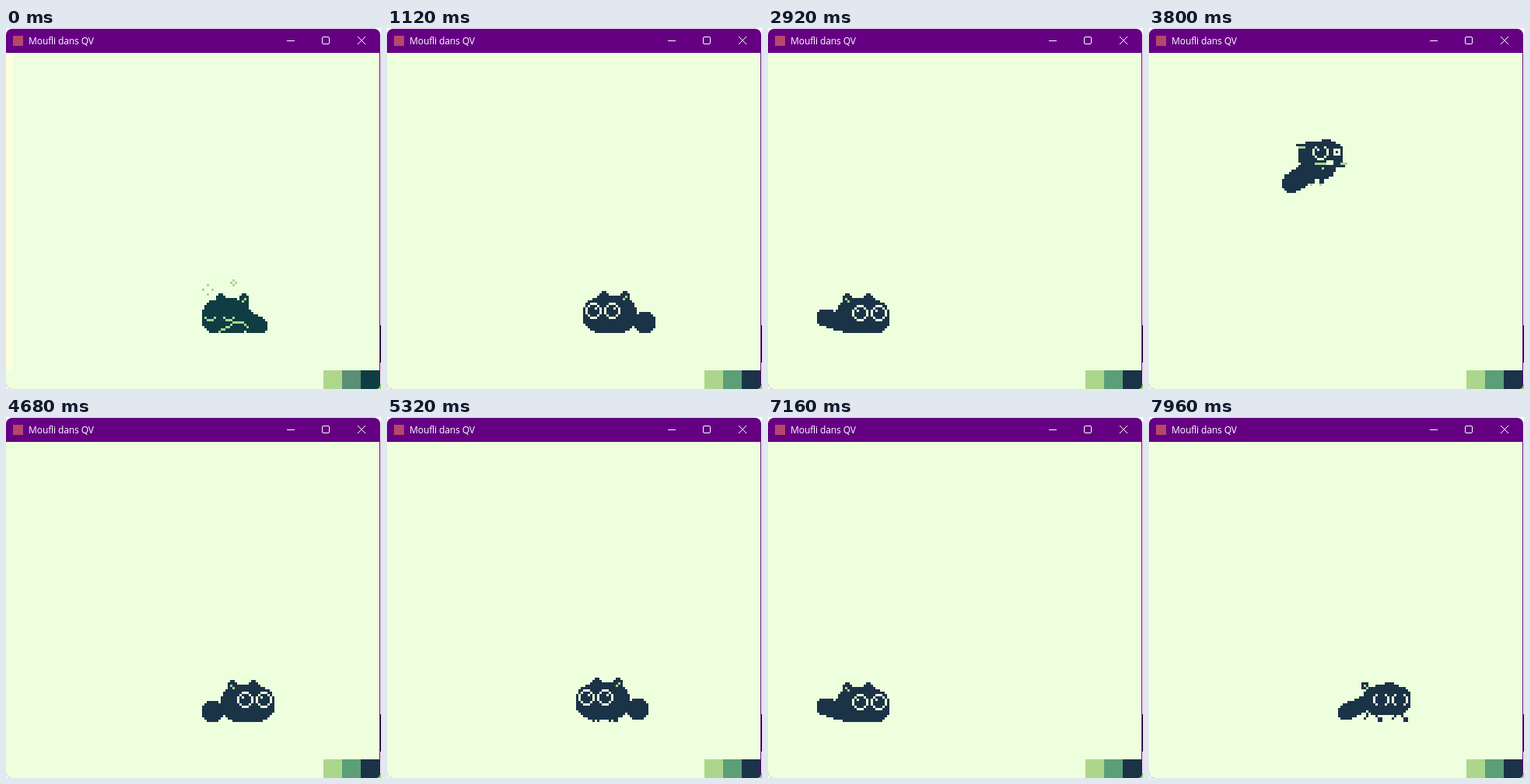
These frames come from a looping animation (482 px wide and 464 px high, 8 s). An HTML page with a canvas:

```html
<!DOCTYPE html>
<html lang="fr">
<head>
<meta charset="utf-8">
<title>Moufli dans QV</title>
<style>
  html, body { margin: 0; width: 100%; height: 100%; overflow: hidden; background: #fff; }
  #stage { position: relative; width: 482px; height: 464px; overflow: hidden; background: #fff; }
  #edge { position: absolute; left: 481px; top: 382px; width: 1px; height: 48px; background: #21082f; }
  #corner { position: absolute; left: 474px; top: 458px; width: 8px; height: 6px; background: #83d957; }
  #window { position: absolute; left: 0; top: 1px; width: 481px; height: 463px; overflow: hidden;
    border-radius: 8px 8px 6px 7px; background: #650083; }
  #icon { position: absolute; left: 9px; top: 9px; width: 13px; height: 13px; background: #b5486a; }
  #title { position: absolute; left: 29px; top: 7px; font: 12px/17px "Open Sans", "Noto Sans", sans-serif;
    letter-spacing: -.1px; color: #fff; white-space: nowrap; }
  svg { position: absolute; left: 0; top: -1px; fill: none; stroke: #fff; }
  canvas { position: absolute; left: 0; top: 31px; width: 480px; height: 432px; image-rendering: pixelated; }
</style>
</head>
<body>
<div id="stage">
  <div id="edge"></div>
  <div id="corner"></div>
  <div id="window">
    <div id="icon"></div>
    <div id="title">Moufli dans QV</div>
    <svg width="481" height="32">
      <path d="M361 16.5h10"/>
      <rect x="406.5" y="11.5" width="9" height="9" rx="1.5"/>
      <path d="M452 11l10 10M462 11l-10 10"/>
    </svg>
    <canvas id="screen" width="160" height="144"></canvas>
  </div>
</div>
<script>
const ctx = document.getElementById('screen').getContext('2d');
const LOOP = 8000, GROUND = 120, STRIDE = 90;
const DAWN = { bg: '#eeffdf', soft: '#aed78c', mid: '#5b8e76', dark: '#103c44' };
const DAY = { bg: '#eeffdd', soft: '#acd68b', mid: '#5b9f78', dark: '#1b3347' };

let pal = DAY;
let originX = 0, originY = 0, span = 31, flip = false;

function plot(x, y, tone) {
  if (originY + y >= GROUND) return;
  ctx.fillStyle = pal[tone];
  ctx.fillRect(originX + (flip ? span - 1 - x : x), originY + y, 1, 1);
}

function box(x, y, w, h, tone = 'dark') {
  for (let j = 0; j < h; j++) for (let i = 0; i < w; i++) plot(x + i, y + j, tone);
}

// Superellipse: a higher power gives squarer shoulders.
function blob(cx, cy, rx, ry, power = 2.5) {
  for (let y = Math.floor(cy - ry); y < cy + ry; y++) {
    for (let x = Math.floor(cx - rx); x < cx + rx; x++) {
      const u = Math.abs(x + .5 - cx) / rx, v = Math.abs(y + .5 - cy) / ry;
      if (u ** power + v ** power <= 1) plot(x, y, 'dark');
    }
  }
}

// Round-ended bar, used for slanted tails and haunches.
function capsule(x1, y1, x2, y2, r) {
  const n = Math.ceil(Math.hypot(x2 - x1, y2 - y1));
  for (let i = 0; i <= n; i++) blob(x1 + (x2 - x1) * i / n, y1 + (y2 - y1) * i / n, r, r);
}

function line(x1, y1, x2, y2, tone = 'dark') {
  const n = Math.max(Math.abs(x2 - x1), Math.abs(y2 - y1));
  for (let i = 0; i <= n; i++) {
    plot(Math.round(x1 + (x2 - x1) * i / n), Math.round(y1 + (y2 - y1) * i / n), tone);
  }
}

function ear(cx, inner) {
  box(cx - 2, 1, 4, 4);
  box(cx - 1, 0, 2, 1);
  if (inner) line(cx, 2, cx - 1, 3, 'soft');
}

// Round spectacle rim; an open rim keeps only its two sides.
function rim(cx, cy, open) {
  for (const s of [-1, 1]) {
    line(cx + s * 3, cy - 1, cx + s * 3, cy + 1, 'bg');
    plot(cx + s * 2, cy - 2, 'bg');
    plot(cx + s * 2, cy + 2, 'bg');
    if (!open) line(cx - 1, cy + s * 3, cx + 1, cy + s * 3, 'bg');
  }
}

function sittingHead() {
  blob(11.5, 10.2, 11.5, 8.2);
  ear(9);
  ear(18, true);
  for (const x of [4, 12]) {
    rim(x, 8);
    plot(x + 1, 7, 'bg');
  }
}

function closedEye(x) {
  plot(x, 10, 'soft');
  line(x + 1, 11, x + 3, 11, 'soft');
  plot(x + 4, 10, 'soft');
}

function spark(x, y, r) {
  if (r > 2) return;
  for (const s of [-r, r]) {
    plot(x + s, y, 'soft');
    plot(x, y + s, 'soft');
  }
}

// Sitting and sleeping poses look left, moving ones look right.
const poses = {
  stand() {
    blob(26.5, 13.5, 4.6, 4.6);
    for (const x of [7, 9, 14, 16]) box(x, 17, x === 16 ? 2 : 1, 2);
    sittingHead();
  },
  crouch() {
    blob(27, 10.6, 4.1, 3.7);
    capsule(20, 13.5, 26, 11.5, 3);
    sittingHead();
  },
  stretch() {
    capsule(3.2, 12.8, 13, 8.5, 3.3);
    blob(21, 7.7, 10.1, 6.6, 2.8);
    box(10, 0, 3, 3);
    box(20, 0, 4, 2);
    line(11, 1, 12, 2, 'soft');
    for (const [x, reach] of [[12, -1], [15, 2], [24, -1], [26, 2]]) {
      line(x, 13, x + reach, 15);
      if (reach > 0) box(x + reach, 15, 2, 2);
    }
    rim(18, 7, true);
    rim(26, 7, true);
  },
  leap() {
    capsule(4.2, 18.8, 10, 15, 4.1);
    blob(16.5, 6.6, 9.6, 6, 2.8);
    blob(16, 11, 7.2, 6.2);
    box(17, 0, 4, 1);
    box(6, 2, 5, 1);
    box(7, 3, 3, 1, 'soft');
    for (const x of [12, 16]) {
      box(x, 16, 2, 3);
      plot(x, 19, 'soft');
    }
    rim(16, 5);
    box(15, 2, 3, 1);
    plot(15, 4, 'bg');
    box(22, 4, 3, 3, 'bg');
    plot(23, 5, 'dark');
    box(14, 10, 5, 1, 'soft');
    box(19, 9, 3, 2, 'bg');
    plot(17, 12, 'soft');
    box(24, 10, 3, 2);
    box(25, 10, 3, 1, 'soft');
  },
  sleep(t) {
    blob(10.5, 10.2, 10.5, 8.2);
    capsule(15, 10, 24, 14, 4);
    ear(8);
    ear(18, true);
    closedEye(1);
    closedEye(9);
    line(13, 12, 17, 12, 'soft');
    line(17, 12, 19, 14, 'soft');
    line(12, 13, 7, 16, 'soft');
    const beat = Math.floor(t / 240);
    spark(2, -2, 1 + (beat + 1) % 3);
    spark(13, -5, 1 + beat % 3);
  }
};

const moves = [
  { gait: 'sleep', start: 0, end: 840, from: 252, to: 252 },
  { gait: 'run', start: 1600, end: 2220, from: 243, to: 63 },
  { gait: 'run', start: 3100, end: 3360, from: 63, to: 126 },
  { gait: 'leap', start: 3566, end: 4294, from: 126, to: 255 },
  { gait: 'run', start: 5890, end: 6610, from: 243, to: 63 },
  { gait: 'run', start: 7260, end: LOOP, from: 63, to: 253 }
];
const LEAP_ROWS = 75.67, SETTLE = 500, SQUAT = 260, HOP = 120;

function moving(move, t) {
  const p = (t - move.start) / (move.end - move.start);
  const odd = Math.floor((t - move.start) / STRIDE) % 2;
  return {
    pose: move.gait !== 'run' ? move.gait : odd ? 'stretch' : 'stand',
    x: move.from + (move.to - move.from) * p,
    right: move.to > move.from,
    lift: move.gait === 'leap' ? Math.round(LEAP_ROWS * (1 - (2 * p - 1) ** 2)) : 0
  };
}

// Settle after a move, hop round halfway, squat before the next one.
function resting(last, next, t) {
  const turnAt = (last.end + next.start) / 2;
  const turned = t >= turnAt;
  const right = m => m.to > m.from;
  const hops = turned && t < turnAt + HOP && right(last) !== right(next);
  return {
    pose: next.start - t <= SQUAT ? 'crouch' : 'stand',
    x: turned ? next.from : last.to,
    right: right(turned ? next : last),
    lift: hops ? 2 : t - last.end < SETTLE ? -1 : 0
  };
}

function drawCat(t) {
  const i = moves.findLastIndex(m => m.start <= t);
  const { pose, x, right, lift } = t < moves[i].end ? moving(moves[i], t) : resting(moves[i], moves[i + 1], t);
  const looksRight = pose === 'stretch' || pose === 'leap';
  originX = Math.round(x / 9) * 3;
  originY = (pose === 'stand' ? 101 : 103) - (pose === 'crouch' ? 0 : lift);
  span = pose === 'sleep' || pose === 'leap' ? 28 : 31;
  flip = right !== looksRight;
  poses[pose](t);
}

function draw(t) {
  pal = t < 400 ? DAWN : DAY;
  ctx.fillStyle = pal.bg;
  ctx.fillRect(0, 0, 160, 144);
  if (pal === DAWN) {
    ctx.fillStyle = '#ffffdd';
    ctx.fillRect(0, 0, 8 / 3, 136);
  }
  ['soft', 'mid', 'dark'].forEach((tone, i) => {
    ctx.fillStyle = pal[tone];
    ctx.fillRect(136 + 8 * i, 136, 8, 8);
  });
  drawCat(t);
}

const began = performance.now();
function tick() {
  draw((performance.now() - began) % LOOP);
  requestAnimationFrame(tick);
}
tick();
</script>
</body>
</html>
```
